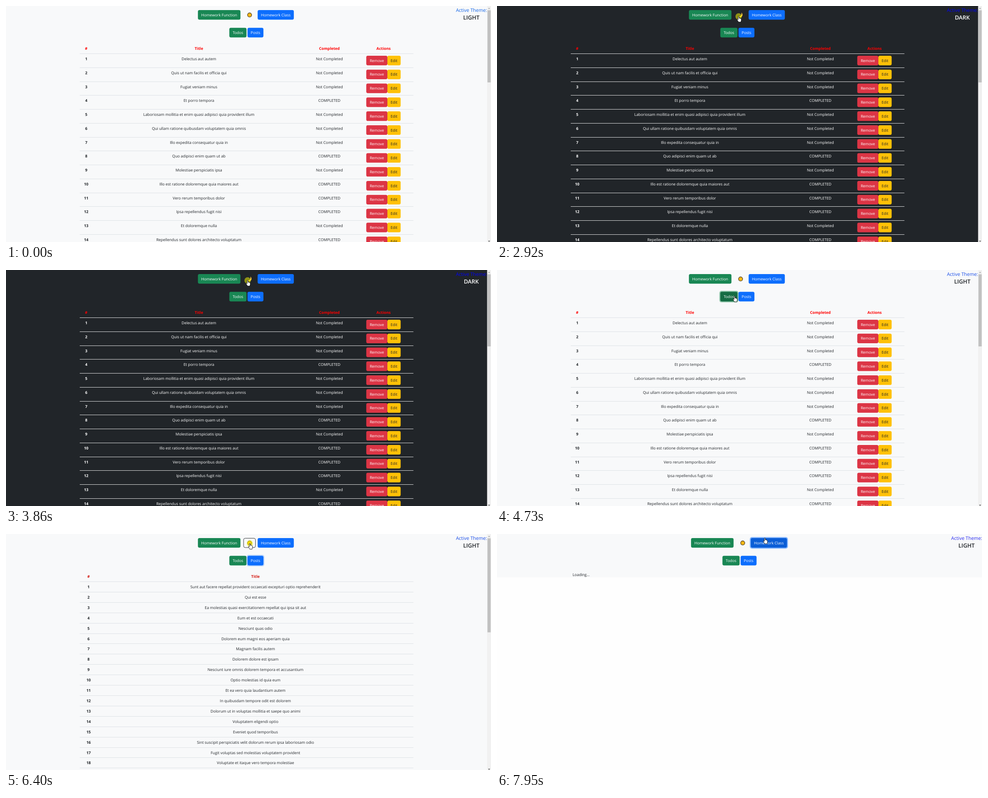
Write an HTML page that moves like this. It is 1072 by 522 pixels and loops after 8 s.

```html
<!DOCTYPE html>
<html lang="en">
<head>
<meta charset="utf-8">
<title>Todos and posts</title>
<style>
html, body { margin: 0; width: 100%; height: 100%; overflow: hidden; background: #fefefe; }
svg {
  --bg: #f8f9fa; --ink: #212529; --line: #dee2e6; --label: #1465e6;
  display: block; width: 1072px; height: 522px;
}
svg.dark { --bg: #212529; --ink: #fff; --line: #d6d7d8; --label: #00f; }
text {
  font: 8.44px "Open Sans", "Noto Sans", sans-serif;
  text-anchor: middle; text-rendering: geometricPrecision; fill: var(--ink);
}
.b { font-weight: 700; }
.th { font-weight: 700; fill: var(--red, #f00); }
.w { fill: #fff; }
.k { fill: #212529; }
.line { fill: var(--line); }
#label { font-size: 10.55px; fill: var(--label); }
#theme { font-size: 12.5px; font-weight: 600; }
#page { fill: var(--bg); }
</style>
</head>
<body>
<svg id="stage" viewBox="0 0 1072 522"></svg>
<script>
const GREEN = [25, 135, 84], GREEN_DARK = [20, 108, 67];
const BLUE = [13, 110, 253], BLUE_DARK = [11, 94, 215];

const todos = `Delectus aut autem
Quis ut nam facilis et officia qui
Fugiat veniam minus
*Et porro tempora
Laboriosam mollitia et enim quasi adipisci quia provident illum
Qui ullam ratione quibusdam voluptatem quia omnis
Illo expedita consequatur quia in
*Quo adipisci enim quam ut ab
Molestiae perspiciatis ipsa
*Illo est ratione doloremque quia maiores aut
*Vero rerum temporibus dolor
*Ipsa repellendus fugit nisi
Et doloremque nulla
*Repellendus sunt dolores architecto voluptatum`.split('\n');

const posts = `Sunt aut facere repellat provident occaecati excepturi optio reprehenderit
Qui est esse
Ea molestias quasi exercitationem repellat qui ipsa sit aut
Eum et est occaecati
Nesciunt quas odio
Dolorem eum magni eos aperiam quia
Magnam facilis autem
Dolorem dolore est ipsam
Nesciunt iure omnis dolorem tempora et accusantium
Optio molestias id quia eum
Et ea vero quia laudantium autem
In quibusdam tempore odit est dolorem
Dolorum ut in voluptas mollitia et saepe quo animi
Voluptatem eligendi optio
Eveniet quod temporibus
Sint suscipit perspiciatis velit dolorum rerum ipsa laboriosam odio
Fugit voluptas sed molestias voluptatem provident
Voluptate et itaque vero tempora molestiae`.split('\n');

const rgb = c => `rgb(${c.map(Math.round)})`;
const text = (x, y, s, cls = '') => `<text x="${x}" y="${y}" class="${cls}">${s}</text>`;
const box = (x, y, w, h, fill, more = '') =>
  `<rect x="${x}" y="${y}" width="${w}" height="${h}" rx="3.4" fill="${fill}" ${more}/>`;
const line = y => `<rect class="line" x="163" y="${Math.round(y)}" width="737.5" height="1"/>`;
const button = (id, x, y, w, s, fill, ring) =>
  box(x - 2.2, y - 2.2, w + 4.4, 25.6, ring, `id="${id}Ring" style="rx:5px"`) +
  box(x, y, w, 21.2, rgb(fill), `id="${id}"`) + text(x + w / 2, y + 13.6, s, 'w');

const STEP = 30.77, POST_STEP = 22.91;

function todoRow(s, i) {
  const y = 105 + STEP * i, done = s[0] === '*', by = y + 5;
  return text(177.3, y + 15, i + 1, 'b') + text(426.3, y + 15, s.replace('*', '')) +
    text(714.8, y + 15, done ? 'COMPLETED' : 'Not Completed') +
    box(796.3, by, 46.7, 21.2, '#dc3545') + text(819.7, by + 13.7, 'Remove', 'w') +
    box(843, by, 29.3, 21.2, '#ffc107') + text(857.6, by + 13.7, 'Edit', 'k') +
    line(y + STEP);
}

function postRow(s, i) {
  const y = 105 + POST_STEP * i;
  return text(182.5, y + 15, i + 1, 'b') + text(551.4, y + 15, s) + line(y + POST_STEP);
}

const spikes = Array.from({ length: 24 }, (_, i) => {
  const r = i % 2 ? 4.4 : 5.7, a = i * Math.PI / 12;
  return `${(538.4 + r * Math.sin(a)).toFixed(2)},${(19.8 - r * Math.cos(a)).toFixed(2)}`;
}).join(' ');

const svg = document.getElementById('stage');
svg.innerHTML = `
<rect id="page" width="1072" height="522"/>
<g id="head">
  ${button('func', 424.2, 9, 94, 'Homework Function', GREEN, 'none')}
  ${box(525.2, 9.4, 26.2, 20.6, 'none', 'id="toggle" stroke="#212529" stroke-width=".9"')}
  <g id="sun"><polygon points="${spikes}" fill="#33240c"/>
    <circle cx="538.4" cy="19.8" r="3.9" fill="#f9b916"/></g>
  <path id="moon" d="M540 14.6A5.6 5.6 0 1 1 533.4 23.6A6.6 6.6 0 0 0 540 14.6Z" fill="#ffc83d"/>
  ${button('cls', 556.2, 9, 80, 'Homework Class', BLUE, '#86b7fe')}
  ${button('todo', 493.6, 48.2, 38, 'Todos', GREEN, '#92c7ac')}
  ${button('post', 533.8, 48.2, 35.2, 'Posts', BLUE, '#86b7fe')}
</g>
<g id="info">
  <text id="label" x="1028.8" y="13">Active Theme:</text>
  <text id="theme" x="1028.5" y="30.2"></text>
</g>
<g id="todos">
  ${text(177.3, 97, '#', 'th') + text(426.3, 97, 'Title', 'th') +
    text(714.8, 97, 'Completed', 'th') + text(834.5, 97, 'Actions', 'th') + line(105)}
  ${todos.map(todoRow).join('')}
</g>
<g id="posts" style="--red:#d3140c">
  ${text(182.5, 97, '#', 'th') + text(551.4, 97, 'Title', 'th') + line(105)}
  ${posts.map(postRow).join('')}
</g>
<text id="loading" x="167" y="93" style="text-anchor:start">Loading...</text>
<g id="bar">
  <rect x="1063.4" width="8.6" height="522" fill="#f1f1f1"/>
  <rect id="thumb" x="1064.2" y="9.5" width="7" fill="#c1c1c1"/>
  <path d="M1065.6 6.2l2.2-2.4 2.2 2.4z" fill="#a3a3a3"/>
  <path d="M1065.6 519.3l2.2 2.4 2.2-2.4z" fill="#505050"/>
</g>
<circle id="spot" r="7" fill="#ff0" fill-opacity=".5"/>
<g id="cursor" fill="#fff" stroke="#000" stroke-width=".8" stroke-linejoin="round">
  <path id="arrow" d="M0 0V10.2L2.4 8L4 11.6L5.6 10.9L4 7.4H7.2Z"/>
  <path id="hand" d="M-1 .7Q-1-.4 0-.4Q1-.4 1 .7V4.2Q2-.3 2.7 4.6Q3.9 3.9 4.4 5Q5.9 4.6 5.9 6.2V8.6Q5.9 10.2 5 11.3V12.6H-.4V11.6Q-2.2 9.6-3.2 7.6Q-3.5 6.3-2.5 6.2Q-1.7 6.3-1 7.4Z"/>
</g>`;

const el = {};
svg.querySelectorAll('[id]').forEach(e => el[e.id] = e);

// Pointer path: time, x, y
const path = [
  [120, 915, 207], [380, 928, 199], [1240, 928, 199], [1840, 518, 62], [1990, 530, 33],
  [2190, 534, 23], [4120, 534, 23], [4330, 541, 57], [4520, 525, 59], [4740, 525, 58],
  [4860, 532, 58], [5000, 545, 59], [5240, 546, 59], [5420, 522, 60], [5620, 522, 60],
  [5790, 546, 59], [5960, 546, 58], [6250, 539, 22], [6400, 539, 21], [7200, 539, 21],
  [7480, 592, 17], [7680, 592, 14], [7950, 592, 9]
];
const presses = [
  [2390, 2460], [2920, 3070], [3410, 3530], [3860, 3920], [4560, 4640], [5060, 5130],
  [5480, 5550], [5850, 5920], [6330, 6540], [6810, 6940], [7630, 7700]
];
const darkTimes = [[2460, 3070], [3470, 3920], [6480, 6880]];
const postTimes = [[5130, 5550], [5920, 7720]];
const LOAD = 7720;
const hover = {
  todo: [[1800, 1960], [4420, 4850], [5340, 5690]],
  post: [[4290, 4400], [4880, 5310], [5710, 6060]],
  cls: [[7300, 9000]]
};
const focus = {
  todo: [[4560, 5060], [5480, 5850]],
  post: [[5060, 5480], [5850, 6330]],
  cls: [[7630, 9000]]
};
const toggleHover = [[2060, 4200], [6200, 7240]];
const shades = { todo: [GREEN, GREEN_DARK], post: [BLUE, BLUE_DARK], cls: [BLUE, BLUE_DARK] };

const clamp = v => Math.max(0, Math.min(1, v));
const within = (t, spans) => spans.some(([a, b]) => t >= a && t < b);
const fade = (t, spans) =>
  Math.max(...spans.map(([a, b]) => Math.min(clamp((t - a) / 150), clamp(1 - (t - b) / 150))));
const show = (e, on) => e.style.display = on ? '' : 'none';

function pointer(t) {
  const i = path.findIndex(p => p[0] > t);
  if (i < 0) return path[path.length - 1].slice(1);
  const [t0, x0, y0] = path[Math.max(0, i - 1)], [t1, x1, y1] = path[i];
  const u = t1 > t0 ? clamp((t - t0) / (t1 - t0)) : 0, k = u * u * (3 - 2 * u);
  return [x0 + (x1 - x0) * k, y0 + (y1 - y0) * k];
}

function render(t) {
  const dark = within(t, darkTimes), loading = t >= LOAD, onPosts = within(t, postTimes);
  svg.classList.toggle('dark', dark);
  el.theme.textContent = dark ? 'DARK' : 'LIGHT';
  el.label.style.fill = dark ? '' : loading ? '#2a2cf0' : t > 3900 ? '#1c4fe8' : '';
  el.page.setAttribute('height', loading ? 96 : 522);
  el.head.setAttribute('transform', `translate(${loading ? 4.7 : 0} 0)`);
  el.info.setAttribute('transform', `translate(${loading ? 9.4 : 0} 0)`);

  show(el.todos, !onPosts && !loading);
  show(el.posts, onPosts && !loading);
  show(el.loading, loading);
  show(el.bar, !loading);
  el.thumb.setAttribute('height', onPosts ? 208 : 159.5);
  show(el.sun, !dark);
  show(el.moon, dark);
  el.toggle.style.opacity = dark ? 0 : fade(t, toggleHover);

  for (const id in hover) {
    const [a, b] = shades[id], k = fade(t, hover[id]);
    el[id].setAttribute('fill', rgb(a.map((v, i) => v + (b[i] - v) * k)));
    el[id + 'Ring'].style.opacity = fade(t, focus[id]);
  }

  const [x, y] = pointer(t), at = `translate(${x.toFixed(2)} ${y.toFixed(2)})`;
  const onRow = x > 796 && x < 872 && y > 110 && (y - 110) % STEP < 21.2;
  const hand = onRow || within(t, [...hover.todo, ...hover.post, ...hover.cls, ...toggleHover]);
  show(el.cursor, t >= 120);
  el.cursor.setAttribute('transform', at);
  show(el.hand, hand);
  show(el.arrow, !hand);
  el.spot.setAttribute('transform', at);
  show(el.spot, within(t, presses));
}

const start = performance.now();
function tick() {
  render((performance.now() - start) % 8000);
  requestAnimationFrame(tick);
}
tick();
</script>
</body>
</html>
```
